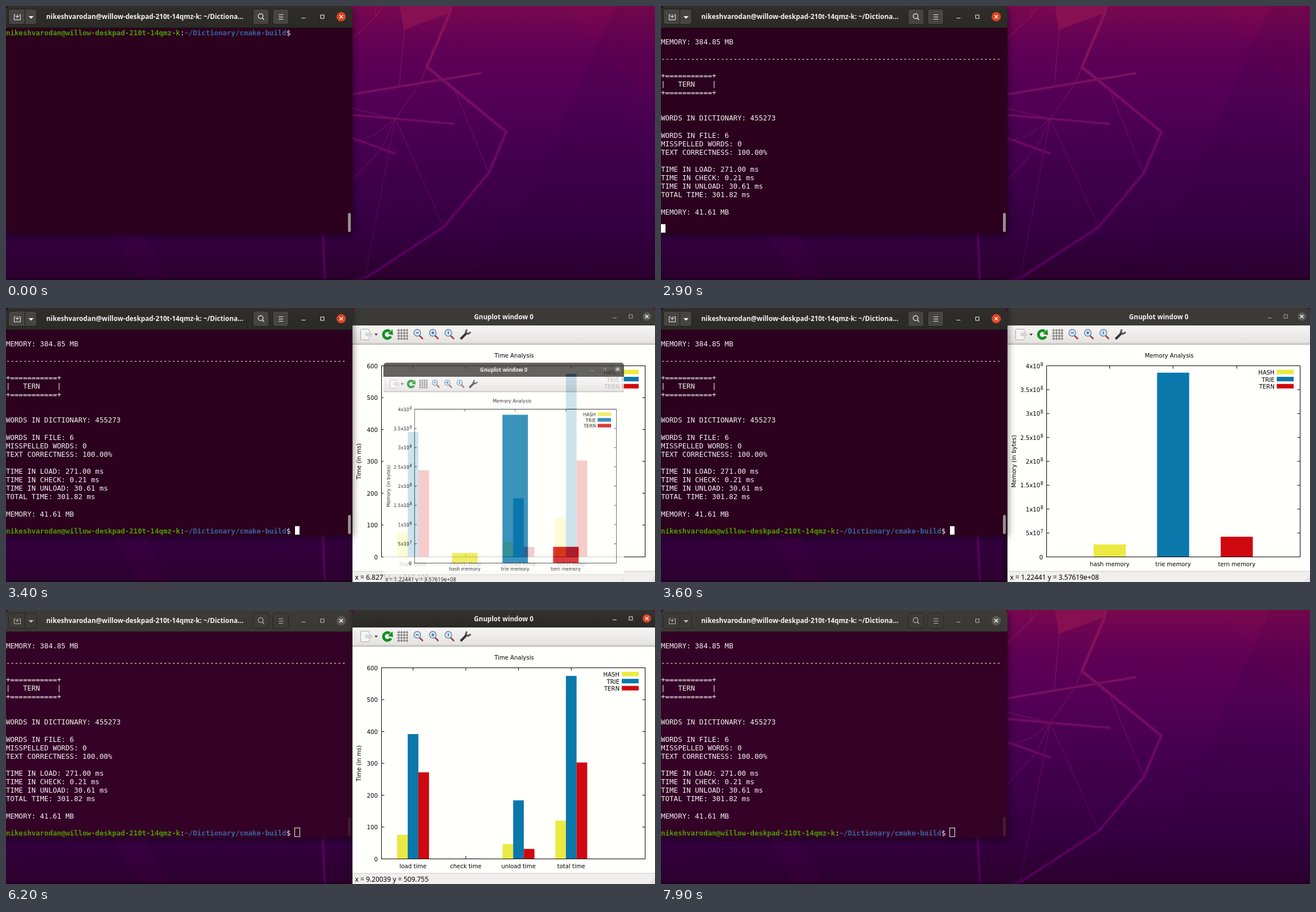
Write an HTML page with a canvas that moves like this. It is 1152 by 486 pixels and loops after 8 s.

```html
<!DOCTYPE html>
<html lang="en">
<head>
<meta charset="utf-8">
<title>Dictionary benchmark</title>
<style>
  html, body { margin: 0; height: 100%; overflow: hidden; background: #2d0030; }
  canvas { display: block; }
</style>
</head>
<body>
<canvas id="stage" width="1152" height="486"></canvas>
<script>
const W = 1152, H = 486, LOOP = 8000;
const USER = 'nikeshvarodan@willow-deskpad-210t-14qmz-k';
const PATH = '~/Dictionary/cmake-build';
const CELL = 7.54, ROW = 15.1, TOP = 40;
const YELLOW = '#eaea42', BLUE = '#0a78ab', RED = '#d0080f';
const UI = '"Noto Sans", sans-serif', PLOT = '10.2px "DejaVu Sans", sans-serif';

const stage = document.getElementById('stage').getContext('2d');
let c = stage;

function layer(paint) {
  const canvas = document.createElement('canvas');
  canvas.width = W;
  canvas.height = H;
  const previous = c;
  c = canvas.getContext('2d');
  paint();
  c = previous;
  return canvas;
}

function rect(x, y, w, h, fill) {
  c.fillStyle = fill;
  c.fillRect(x, y, w, h);
}

function line(points, color, width = 1) {
  c.beginPath();
  for (let i = 0; i < points.length; i += 2) c.lineTo(points[i], points[i + 1]);
  c.strokeStyle = color;
  c.lineWidth = width;
  c.stroke();
}

function poly(points, fill) {
  c.beginPath();
  for (let i = 0; i < points.length; i += 2) c.lineTo(points[i], points[i + 1]);
  c.fillStyle = fill;
  c.fill();
}

function circle(x, y, r, fill, stroke, width = 1) {
  c.beginPath();
  c.arc(x, y, r, 0, 7);
  if (fill) { c.fillStyle = fill; c.fill(); }
  if (stroke) { c.strokeStyle = stroke; c.lineWidth = width; c.stroke(); }
}

function rounded(x, y, w, h, r, fill, stroke) {
  c.beginPath();
  c.roundRect(x, y, w, h, r);
  c.fillStyle = fill;
  c.fill();
  if (stroke) { c.strokeStyle = stroke; c.lineWidth = 1; c.stroke(); }
}

function text(s, x, y, font, color = '#000', align = 'center') {
  c.font = font;
  c.fillStyle = color;
  c.textAlign = align;
  c.fillText(s, x, y);
}

function fade(y0, y1, ...colors) {
  const g = c.createLinearGradient(0, y0, 0, y1);
  colors.forEach((color, i) => g.addColorStop(i / (colors.length - 1), color));
  return g;
}

const mix = (a, b, k) => `rgb(${a.map((v, i) => Math.round(v + (b[i] - v) * k))})`;

function windowButtons([min, max, close], y, r, color, closeFill) {
  line([min - 3.5, y + 2.5, min + 3.5, y + 2.5], color);
  c.strokeRect(max - 3, y - 3, 6, 6);
  circle(close, y, r, closeFill);
  line([close - 3, y - 3, close + 3, y + 3], '#fff', 1.4);
  line([close - 3, y + 3, close + 3, y - 3], '#fff', 1.4);
}

const wallpaper = layer(() => {
  rect(0, 0, W, H, fade(0, H, '#78084f', '#5f0056', '#530056', '#470050', '#3d0049', '#340040', '#2b002d'));
  poly([990, 0, 1152, 0, 1152, 180], 'rgba(150,0,80,.07)');
  poly([1082, 0, 1152, 0, 1152, 130, 918, 358], 'rgba(30,0,50,.10)');
  poly([918, 358, 1152, 130, 1152, 486, 800, 486], 'rgba(30,0,50,.08)');
  poly([190, 404, 245, 404, 290, 486, 235, 486], 'rgba(120,0,100,.08)');
  const ink = fade(0, H, '#8c1358', '#7a1060', '#6b0860', '#5f0260', '#4d0056');
  poly([700, 0, 790, 0, 788, 12, 707, 42], '#871053');
  c.lineJoin = 'round';
  line([790, 0, 788, 12, 747, 108, 888, 223, 857, 296, 777, 392, 637, 483, 600, 490], ink, 5);
  [[600, 159, 844, 119], [600, 192, 797, 209], [600, 229, 692, 262], [562, 395, 566, 486]]
    .forEach(p => line(p, ink, 4));
  [[600, 178, 691, 200, 735, 137, 747, 108], [691, 200, 655, 228, 600, 246],
   [691, 200, 667, 252, 600, 325], [637, 483, 691, 200, 777, 392],
   [798, 153, 857, 296], [700, 0, 707, 42, 698, 142],
   [670, 0, 655, 20, 600, 72], [657, 0, 655, 20]]
    .forEach(p => line(p, ink, 1.3));
  rect(0, 483, W, 3, 'rgba(25,0,25,.45)');
});

const report = (name, before, load, check, unload, total, memory) => [
  '', `MEMORY: ${before} MB`, '', '-'.repeat(80), '',
  '+===========+', `|   ${name}    |`, '+===========+', '', '',
  'WORDS IN DICTIONARY: 455273', '',
  'WORDS IN FILE: 6', 'MISSPELLED WORDS: 0', 'TEXT CORRECTNESS: 100.00%', '',
  `TIME IN LOAD: ${load} ms`, `TIME IN CHECK: ${check} ms`,
  `TIME IN UNLOAD: ${unload} ms`, `TOTAL TIME: ${total} ms`, '',
  `MEMORY: ${memory} MB`, ''
];
const trieReport = report('TRIE', '25.73', '390.52', '0.17', '183.04', '573.73', '384.85');
const ternReport = report('TERN', '384.85', '271.00', '0.21', '30.61', '301.82', '41.61');

// Characters sit on the terminal's fixed grid.
function cells(s, col, row, color = '#f4f2f3', weight = '') {
  const font = `${weight} 12.5px "DejaVu Sans Mono", monospace`;
  [...s].forEach((ch, i) => text(ch, (col + i) * CELL, TOP + row * ROW + 12.4, font, color, 'left'));
}

function prompt(row) {
  cells(USER, 0, row, '#4e9a06', 'bold');
  cells(':', 41, row);
  cells(PATH, 42, row, '#3b62a0', 'bold');
  cells('$', 66, row);
}

function cursor(col, row, hollow) {
  const x = Math.round(col * CELL), y = Math.round(TOP + row * ROW);
  if (hollow) {
    c.strokeStyle = '#f4f2f3';
    c.lineWidth = 1;
    c.strokeRect(x - .5, y - .5, 9, 15.5);
  } else rect(x, y, 8, 15, '#fff');
}

function terminalContent(t) {
  if (t < 2800) {
    prompt(0);
    if (t >= 1000) {
      cells('./dictionary', 68, 0);
      cells('../texts/sample.txt', 1, 1);
    }
    if (t >= 100 && t < 700) cursor(68, 0);
    if ((t >= 1000 && t < 1300) || (t >= 1700 && t < 2000)) cursor(20, 1);
    if (t >= 2000 && t < 2300) cursor(0, 2);
    return;
  }
  (t < 2900 ? trieReport : ternReport).forEach((s, i) => cells(s, 0, i));
  if (t < 3100) return cursor(0, 23);
  prompt(23);
  if (t < 4100 || t >= 4600) cursor(68, 23, t >= 4600);
}

function terminal(t) {
  const dim = Math.min(1, Math.max(0, (t - 4500) / 300));
  c.save();
  c.shadowColor = 'rgba(0,0,0,.55)';
  c.shadowBlur = 14;
  c.shadowOffsetY = 2;
  rounded(-8, 0, 623, 404, [0, 7, 0, 0], mix([43, 1, 30], [52, 2, 38], dim));
  c.restore();
  rounded(0, 0, 615, 39, [7, 7, 0, 0], fade(0, 39, mix([47, 46, 42], [62, 60, 57], dim), mix([43, 42, 38], [58, 56, 53], dim)));
  rect(0, 38, 615, 1, '#1d1c1a');

  const button = mix([70, 69, 65], [61, 59, 56], dim), edge = mix([31, 30, 28], [40, 38, 36], dim);
  const icon = mix([245, 245, 243], [190, 188, 184], dim);
  [[4.5, 50], [438.5, 28], [473.5, 28]].forEach(([x, w]) => rounded(x, 5.5, w, 27, 4, button, edge));
  line([33.5, 6, 33.5, 32], edge);
  line([17, 15.5, 14.5, 15.5, 14.5, 24.5, 25.5, 24.5, 25.5, 15.5, 23, 15.5], icon);
  line([20, 15, 20, 22], icon);
  line([16.5, 18.5, 23.5, 18.5], icon);
  poly([40, 18, 49, 18, 44.5, 22.5], icon);
  circle(452, 18, 4.3, null, icon, 1.2);
  line([455, 21, 458, 24.5], icon, 1.2);
  [15.5, 19.5, 23.5].forEach(y => line([484, y, 492, y], icon));
  windowButtons([528, 561.5, 595], 19, 8.3, icon, t < 4900 ? '#dc4421' : '#5c5a56');
  text(USER + ': ~/Dictiona…', 246.5, 23.4, 'bold 11.8px ' + UI, '#f5f4f2');

  terminalContent(t);
  rounded(607, 367, 5, 34, 2.5, mix([151, 142, 146], [68, 28, 56], dim));
}

function magnifier(x, mark) {
  line([x + 3, 49, x + 9, 55], '#a23c48', 2.6);
  circle(x - 1, 44, 6, '#d5e6f6', '#6783a0', 1.4);
  if (mark !== '1') line([x - 3.5, 44, x + 1.5, 44], '#24589a', 1.5);
  if (mark !== '-') line([x - 1, 41.5, x - 1, 46.5], '#24589a', 1.5);
}

function toolbar() {
  rect(615, 31, 537, 34, fade(31, 65, '#f7f6f5', '#e3e1de'));
  rect(615, 62, 537, 1, '#c3c0bc');
  rect(615, 64, 537, 1, '#a8a5a1');
  for (let y = 38; y < 56; y += 3) rect(619, y, 1, 1, '#bbb8b4');
  rounded(629.5, 37.5, 15, 19, 1, '#f4f4f3', '#aaa9a6');
  poly([638, 44, 644, 44, 644, 40, 651, 47, 644, 54, 644, 50, 638, 50], '#d4d4d2');
  poly([654, 45.5, 660, 45.5, 657, 49], '#333');
  c.beginPath();
  c.arc(677, 47, 7, .5, 5.4);
  c.strokeStyle = '#149022';
  c.lineWidth = 5;
  c.stroke();
  poly([678, 46, 686, 38, 687, 48], '#149022');
  for (let i = 0; i < 4; i++) {
    line([697 + i * 5, 37, 697 + i * 5, 57], '#777', 1.3);
    line([694, 39.5 + i * 5, 714, 39.5 + i * 5], '#777', 1.3);
  }
  ['-', '+', '1'].forEach((mark, i) => magnifier(731 + i * 27.6, mark));
  line([807, 55, 818, 44], '#333', 4);
  line([818, 38, 816, 43, 820, 46, 825, 43], '#555', 3);
}

function axes(left, maxTick, label, title, centers, names) {
  c.strokeStyle = '#000';
  c.lineWidth = 1;
  c.strokeRect(left + .5, 102.5, 1134 - left, 339);
  for (let i = 0; i <= maxTick; i++) {
    const y = 441.5 - 339 * i / maxTick;
    line([left + .5, y, left + 5.5, y], '#000');
    line([1129.5, y, 1134.5, y], '#000');
    label(i, y + 4);
  }
  centers.forEach((x, i) => {
    line([x, 102, x, 107.5], '#000');
    line([x, 436, x, 441], '#000');
    text(names[i], x, 458, PLOT);
  });
  text(title, 902, 88, PLOT);
  ['HASH', 'TRIE', 'TERN'].forEach((name, i) => {
    text(name, 1089, 118 + i * 12.6, PLOT, '#000', 'right');
    rect(1093, 109.5 + i * 12.6, 30, 8, [YELLOW, BLUE, RED][i]);
  });
}

function sideLabel(s) {
  c.save();
  c.translate(630, 272);
  c.rotate(-Math.PI / 2);
  text(s, 0, 0, PLOT);
  c.restore();
}

function bar(x, w, share, color) {
  rect(x, 441 - 339 * share, w, 339 * share, color);
}

function timePlot() {
  const groups = [[75, 391, 271], [.2, .2, .2], [45.5, 183, 30.6], [119.5, 573.7, 301.8]];
  const centers = groups.map((_, i) => 722.5 + i * 93.6);
  axes(666, 6, (i, y) => text(i * 100, 660, y, PLOT, '#000', 'right'), 'Time Analysis',
    centers, ['load time', 'check time', 'unload time', 'total time']);
  groups.forEach((g, i) => g.forEach((v, j) =>
    bar(centers[i] + (j - 1.5) * 18.9, 18.9, v / 600, [YELLOW, BLUE, RED][j])));
  sideLabel('Time (in ms)');
}

function memoryPlot() {
  const centers = [796.5, 909, 1022];
  axes(684, 8, (i, y) => {
    if (!i) return text('0', 678, y, PLOT, '#000', 'right');
    const [base, power] = i === 1 ? ['5x10', '7'] : [`${i / 2}x10`, '8'];
    text(base, 673, y, PLOT, '#000', 'right');
    text(power, 678.5, y - 4, '8px "DejaVu Sans", sans-serif', '#000', 'right');
  }, 'Memory Analysis', centers, ['hash memory', 'trie memory', 'tern memory']);
  [.064, .9625, .104].forEach((v, i) => bar(centers[i] - 28.5, 57, v, [YELLOW, BLUE, RED][i]));
  sideLabel('Memory (in bytes)');
}

const plotWindow = (plot, focused, status) => layer(() => {
  rounded(615, 0, 537, 40, [7, 7, 0, 0], focused ? fade(0, 31, '#34332f', '#2a2926') : '#3c3a37');
  windowButtons([1080.5, 1109, 1137.5], 15, 7.5, focused ? '#eee' : '#aaa8a4', focused ? '#dc4421' : '#5c5a56');
  text('Gnuplot window 0', 883.5, 19.6, 'bold 11.7px ' + UI, '#f5f4f2');
  toolbar();
  rect(615, 65, 537, 402, '#fffffc');
  plot();
  rect(615, 467, 537, 19, '#f0efed');
  rect(615, 466.5, 537, 1, '#cfccc8');
  text(status, 619.5, 481.7, '12px ' + UI, '#000', 'left');
  for (let i = 0; i < 4; i++)
    for (let j = 0; j <= i; j++) rect(1150 - j * 2.5, 476 + i * 2.5, 1, 1, '#aaa');
});

const timeBack = plotWindow(timePlot, false, 'x = 6.82754 y = 563.102');
const timeFront = plotWindow(timePlot, true, 'x = 9.20039 y = 509.755');
const memoryBack = plotWindow(memoryPlot, false, 'x = 1.22441 y = 3.57619e+08');
const memoryFront = plotWindow(memoryPlot, true, 'x = 1.37328 y = 3.39837e+08');

function show(image, scaleX = 1, scaleY = scaleX, alpha = 1, pivotY = 243) {
  c.save();
  c.globalAlpha = alpha;
  c.translate(883.5, pivotY);
  c.scale(scaleX, scaleY);
  c.translate(-883.5, -pivotY);
  if (scaleX === 1) {
    c.shadowColor = 'rgba(0,0,0,.4)';
    c.shadowBlur = 12;
  }
  c.drawImage(image, 0, 0);
  c.restore();
}

// Windows pop up from the bottom edge with an exponential ease-out, growing in height a little sooner.
function open(image, age) {
  const k = age >= 200 ? 1 : 1 - 2 ** (-10 * (age + 57.3) / 250);
  show(image, k, k ** .95, k, 497);
}

function close(image, age) {
  if (age < 100) show(image, .9, .9, .5);
  else if (age < 300) show(image, .842, .842, .05);
}

function plots(t) {
  if (t < 3100 || t >= 7900) return;
  if (t >= 7800) return close(timeFront, 0);
  if (t >= 6200) return show(timeFront);
  open(timeBack, t - 3100);
  if (t >= 5400) close(memoryFront, t - 5400);
  else if (t >= 4700) show(memoryFront);
  else if (t >= 3400) open(memoryBack, t - 3400);
}

function frame(now) {
  const t = Math.floor(now % LOOP / 100) * 100;
  c.drawImage(wallpaper, 0, 0);
  // The focused window lies on top and casts its shadow on the other.
  const order = t < 4600 ? [plots, terminal] : [terminal, plots];
  order.forEach(draw => draw(t));
  requestAnimationFrame(frame);
}
requestAnimationFrame(frame);
</script>
</body>
</html>
```
